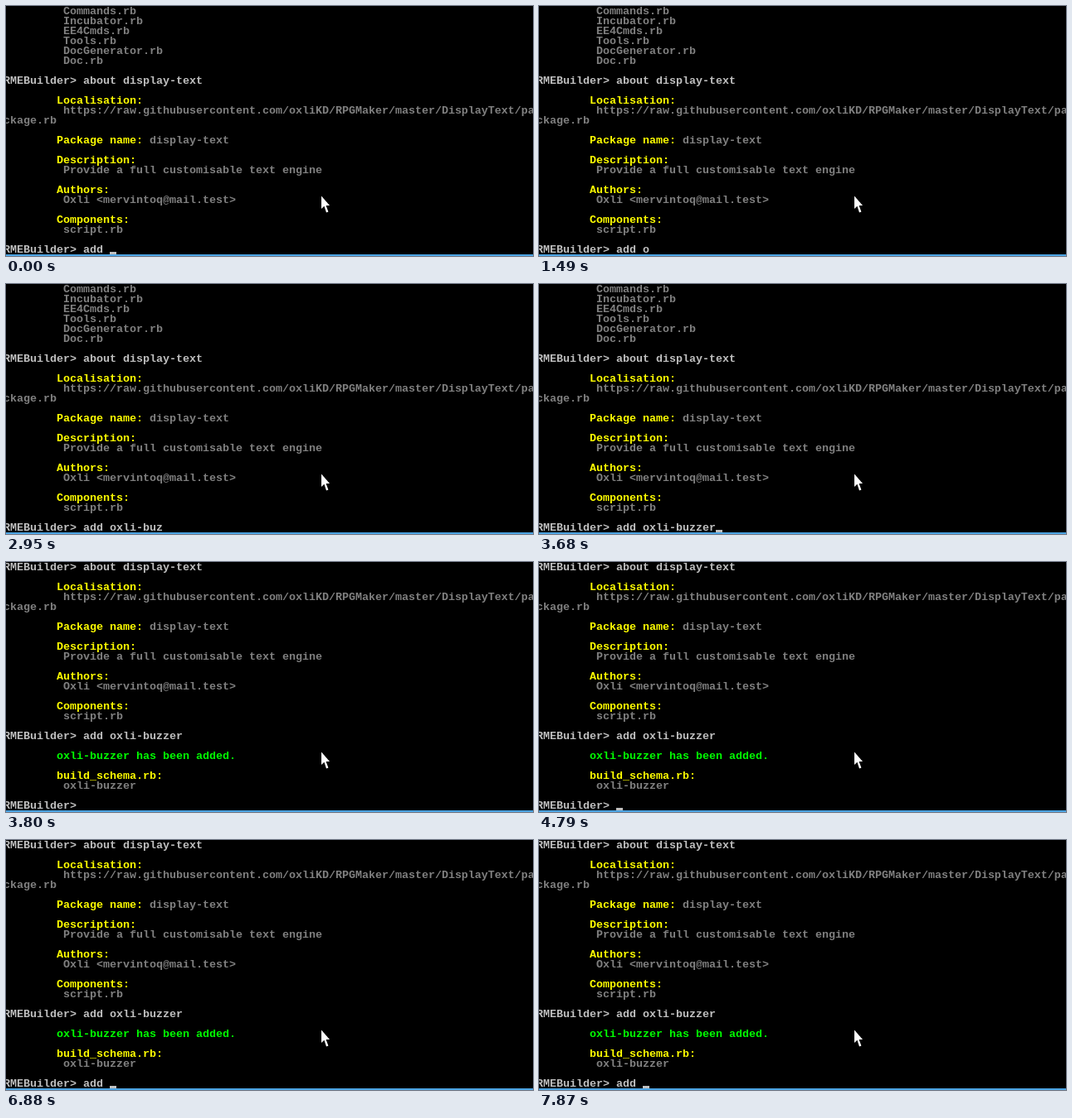
An HTML page for the animation above (8000 ms loop, 635 by 302 pixels).

```html
<!DOCTYPE html>
<html lang="en">
<head>
<meta charset="utf-8">
<title>Terminal session</title>
<style>
  html, body { margin: 0; width: 100%; height: 100%; overflow: hidden; background: #000; }
  #stage { position: relative; width: 635px; height: 302px; overflow: hidden; background: #000; }
  #screen { position: absolute; inset: 0 0 2px; overflow: hidden; }
  #log {
    position: absolute; left: -3px; top: 0; margin: 1px 0 0;
    font: bold 13.333px/12px "Liberation Mono", monospace;
    font-variant-ligatures: none;
    color: #808080; white-space: pre;
  }
  #log div { height: 12px; }
  #log .head { color: #ff0; }
  #log .done { color: #0f0; }
  #log .prompt { color: #c0c0c0; }
  #caret { position: absolute; top: 297px; width: 8px; height: 3px; background: #c0c0c0; }
  #edge { position: absolute; left: 0; top: 300px; width: 100%; height: 2px; background: #4ba3e3; }
  #pointer { position: absolute; left: 379px; top: 228px; }
</style>
</head>
<body>
<div id="stage">
  <div id="screen">
    <div id="log"></div>
    <div id="caret"></div>
  </div>
  <div id="edge"></div>
  <svg id="pointer" width="14" height="24">
    <path d="M1 1.5V17L4.4 13.8L7 21.5L9.4 20.6L6.6 13H11Z" fill="#fff"/>
  </svg>
</div>
<script>
const LOOP = 8000, CELL = 8, ROW = 12, LEFT = -3;
const PROMPT = 'RMEBuilder> ';
const SCROLLED = 7;      // rows moved up once the command has run
const ENTER = 3800;

// Prefixes: ">" prompt, "#" heading, "!" success, "." output, "<" wrapped output
const lines = `
. Commands.rb
. Incubator.rb
. EE4Cmds.rb
. Tools.rb
. DocGenerator.rb
. Doc.rb

>about display-text

#Localisation:
. https://raw.githubusercontent.com/oxliKD/RPGMaker/master/DisplayText/pa
<ckage.rb

#Package name:| display-text

#Description:
. Provide a full customisable text engine

#Authors:
. Oxli <mervintoq@mail.test>

#Components:
. script.rb

>

!oxli-buzzer has been added.

#build_schema.rb:
. oxli-buzzer

>`.slice(1).split('\n');

// A trailing underscore stands for the visible caret
const steps = [
  [0, 'add _'], [620, 'add '], [1120, 'add _'],
  [1490, 'add o'], [1610, 'add ox'], [1860, 'add oxl'], [1980, 'add oxli'],
  [2100, 'add oxli_'], [2340, 'add oxli-'], [2580, 'add oxli-b_'],
  [2830, 'add oxli-bu'], [2950, 'add oxli-buz'], [3190, 'add oxli-buzz'],
  [3310, 'add oxli-buzze'], [3430, 'add oxli-buzzer'], [3680, 'add oxli-buzzer_'],
  [ENTER, ''], [4790, '_'], [5290, ''],
  [5660, 'a'], [5780, 'a_'], [5900, 'ad'], [6020, 'add'], [6260, 'add_'],
  [6510, 'add '], [6880, 'add _'], [7370, 'add '], [7870, 'add _']
];

const log = document.getElementById('log');
const caret = document.getElementById('caret');
const inputs = [];

function addSpan(row, text, name) {
  const span = document.createElement('span');
  span.textContent = text;
  span.className = name;
  return row.appendChild(span);
}

for (const line of lines) {
  const row = log.appendChild(document.createElement('div'));
  const kind = line[0], text = line.slice(1), indent = ' '.repeat(8);
  if (kind === '>') {
    const span = addSpan(row, PROMPT + text, 'prompt');
    if (!text) inputs.push(span);
  } else if (kind === '#' || kind === '!') {
    const [label, value = ''] = text.split('|');
    addSpan(row, indent + label, kind === '#' ? 'head' : 'done');
    addSpan(row, value, '');
  } else if (kind) {
    addSpan(row, (kind === '.' ? indent : '') + text, '');
  }
}

let shown;
function draw() {
  const time = performance.now() % LOOP;
  const step = steps.findLast(([start]) => start <= time);
  if (step !== shown) {
    shown = step;
    const entered = time >= ENTER;
    const typed = step[1].replace('_', '');
    inputs[0].textContent = PROMPT + (entered ? 'add oxli-buzzer' : typed);
    inputs[1].textContent = PROMPT + (entered ? typed : '');
    log.style.top = (entered ? -SCROLLED * ROW : 0) + 'px';
    caret.style.left = LEFT + (PROMPT.length + typed.length) * CELL + 'px';
    caret.style.visibility = step[1].endsWith('_') ? 'visible' : 'hidden';
  }
  requestAnimationFrame(draw);
}
draw();
</script>
</body>
</html>
```
